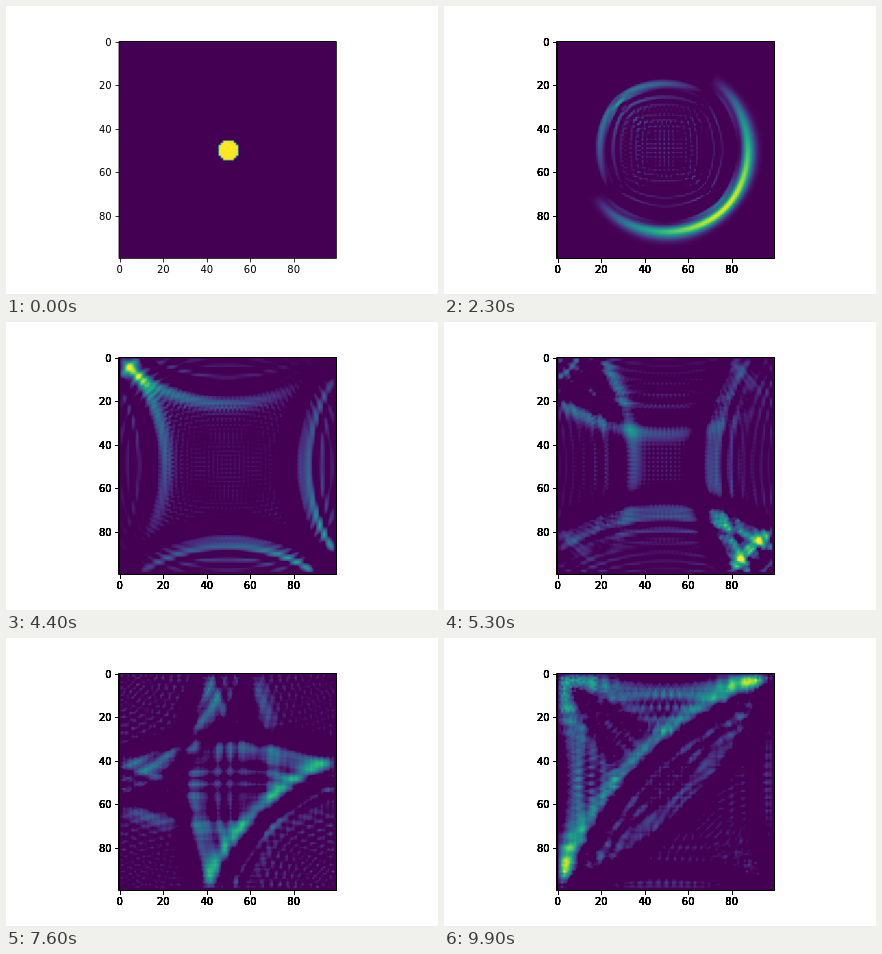
Recreate the animation shown at these times as an HTML page with a canvas. Size 432x288 px, loop 10000 ms.

```html
<!DOCTYPE html>
<html lang="en">
<head>
<meta charset="utf-8">
<title>Wave in a box</title>
<style>
  html, body { margin: 0; width: 432px; height: 288px; overflow: hidden; background: #fff; }
  canvas, svg { position: absolute; left: 0; top: 0; display: block; }
  text { font: 10px "DejaVu Sans", sans-serif; fill: #000; }
  path { fill: none; stroke: #000; stroke-width: 0.8; stroke-linecap: square; }
</style>
</head>
<body>
<canvas id="field" width="432" height="288"></canvas>
<svg id="plot" width="432" height="288" viewBox="0 0 432 288"><g id="axes"></g></svg>
<script>
const N = 100, FRAMES = 100, FRAME_MS = 100;
const STEPS = 5;          // time steps per frame
const COURANT2 = 0.1;     // (c dt / dx)^2
const LEFT = 112.68, TOP = 34.56, CELL = 2.1744;
const PX = 113, PY = 35, SIZE = 217;
const INKS = 8;           // the axes are inked over themselves in the first frames

// --- wave equation with fixed edges ---
function disk(center) {
  const u = new Float64Array(N * N);
  for (let y = 0; y < N; y++)
    for (let x = 0; x < N; x++)
      if ((x - center) ** 2 + (y - center) ** 2 < 25) u[y * N + x] = 1;
  return u;
}

function step(prev, cur) {
  const next = new Float64Array(N * N);
  for (let y = 1; y < N - 1; y++)
    for (let x = 1; x < N - 1; x++) {
      const i = y * N + x;
      const lap = cur[i - 1] + cur[i + 1] + cur[i - N] + cur[i + N] - 4 * cur[i];
      next[i] = 2 * cur[i] - prev[i] + COURANT2 * lap;
    }
  return next;
}

function simulate() {
  let prev = disk(49), cur = disk(50);   // starts out moving down the diagonal
  const frames = [cur];
  while (frames.length < FRAMES) {
    for (let s = 0; s < STEPS; s++) [prev, cur] = [cur, step(prev, cur)];
    frames.push(cur);
  }
  return frames;
}

// --- viridis colour table ---
const stops = ("440154 481567 482677 453781 404788 39568c 33638d 2d708e 287d8e 238a8d " +
  "1f968b 20a387 29af7f 3cbb75 55c667 73d055 95d840 b8de29 dce319 fde725")
  .split(" ").map(h => [0, 2, 4].map(i => parseInt(h.slice(i, i + 2), 16)));

const palette = Array.from({ length: 256 }, (_, i) => {
  const p = i / 255 * (stops.length - 1);
  const k = Math.min(Math.floor(p), stops.length - 2);
  return stops[k].map((v, c) => Math.round(v + (stops[k + 1][c] - v) * (p - k)));
});

// --- Hann-weighted resampling from cells to pixels ---
const clampCell = i => Math.max(0, Math.min(N - 1, i));

function taps(first, origin) {
  return Array.from({ length: SIZE }, (_, i) => {
    const s = (first + i + 0.5 - origin) / CELL - 0.5;
    const k = Math.floor(s);
    return { a: clampCell(k), b: clampCell(k + 1), w: 0.5 - 0.5 * Math.cos(Math.PI * (s - k)) };
  });
}

const cols = taps(PX, LEFT), rows = taps(PY, TOP);
const ctx = document.getElementById("field").getContext("2d");
const image = ctx.createImageData(SIZE, SIZE);

function paint(u) {
  const out = image.data;
  let o = 0;
  for (const r of rows) {
    const ra = r.a * N, rb = r.b * N;
    for (const c of cols) {
      const top = u[ra + c.a] * (1 - c.w) + u[ra + c.b] * c.w;
      const bottom = u[rb + c.a] * (1 - c.w) + u[rb + c.b] * c.w;
      const v = top * (1 - r.w) + bottom * r.w;
      const rgb = palette[Math.max(0, Math.min(255, Math.floor(v * 256)))];
      out[o++] = rgb[0];
      out[o++] = rgb[1];
      out[o++] = rgb[2];
      out[o++] = 255;
    }
  }
  ctx.putImageData(image, PX, PY);
}

// --- axes ---
const plot = document.getElementById("plot");

function add(parent, tag, attrs, label = "") {
  const el = document.createElementNS("http://www.w3.org/2000/svg", tag);
  for (const key in attrs) el.setAttribute(key, attrs[key]);
  el.textContent = label;
  return parent.appendChild(el);
}

function buildAxes() {
  const g = document.getElementById("axes");
  add(g, "path", { d: "M113.5 35.5H330.5V252.5H113.5Z" });
  for (let v = 0; v < N; v += 20) {
    const x = LEFT + (v + 0.5) * CELL, y = TOP + (v + 0.5) * CELL;
    add(g, "path", { d: `M${Math.round(x) + 0.5} 252.5v3.5`, "stroke-linecap": "butt" });
    add(g, "path", { d: `M113.5 ${Math.round(y) + 0.5}h-3.5`, "stroke-linecap": "butt" });
    add(g, "text", { x, y: 267, "text-anchor": "middle" }, v);
    add(g, "text", { x: 105.7, y: Math.round(y + 4), "text-anchor": "end" }, v);
  }
  return Array.from({ length: INKS - 1 }, () => add(plot, "use", { href: "#axes" }));
}

const inks = buildAxes();
const frames = simulate();
let shown = -1;

function show(n) {
  if (n === shown) return;
  shown = n;
  paint(frames[n]);
  inks.forEach((el, i) => { el.style.display = i < n ? "" : "none"; });
}

show(0);
const start = performance.now();

function tick(now) {
  show(Math.floor(Math.max(0, now - start) / FRAME_MS) % FRAMES);
  requestAnimationFrame(tick);
}
requestAnimationFrame(tick);
</script>
</body>
</html>
```
